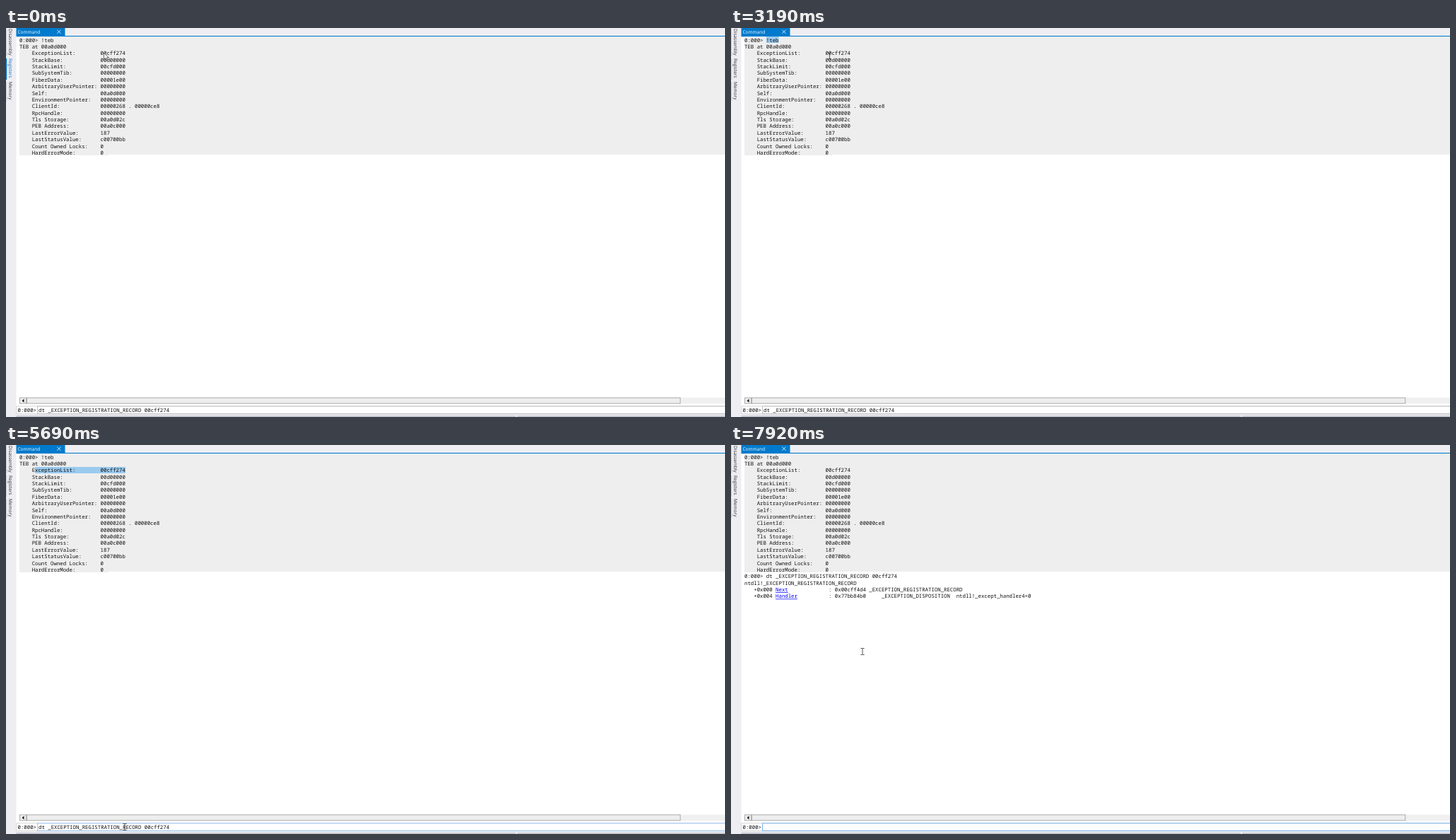
Recreate the animation shown at these times as an HTML page. Size 1017x550 px, loop 8 s.

```html
<!DOCTYPE html>
<html lang="en">
<head>
<meta charset="utf-8">
<title>Debugger command window</title>
<style>
  html, body { margin: 0; width: 100%; height: 100%; overflow: hidden; background: #fff; }
  svg { display: block; width: 1017px; height: 550px; }
  text { white-space: pre; text-rendering: geometricPrecision; }
  .mono { font: 7.35px "Noto Sans Mono", "DejaVu Sans Mono", monospace; fill: #111; }
  .ui { font: 6.5px "Open Sans", "Noto Sans", sans-serif; fill: #2c2c34; }
  .link { fill: #00f; text-decoration: underline; }
</style>
</head>
<body>
<svg viewBox="0 0 1017 550">
  <rect width="1017" height="550" fill="#eeeef2"/>
  <rect x="14.5" y="12" width="1003" height="534" fill="#fff"/>

  <!-- side tabs -->
  <g id="side" class="ui"></g>

  <!-- window tab -->
  <path d="M14.5 0H83.5V11H1017V12.2H14.5z" fill="#007acc"/>
  <text class="ui" x="16.5" y="7.8" style="fill:#fff">Command</text>
  <path d="M72.3 2.7l5.2 5.2m0-5.2l-5.2 5.2" stroke="#fff" stroke-width=".8"/>

  <!-- output -->
  <path d="M19 12.2H1017V179H144V180H19z" fill="#eee"/>
  <rect id="sel" height="9"/>
  <g id="first" class="mono"></g>
  <g id="second" class="mono"></g>

  <!-- scroll bar -->
  <rect x="19" y="522.6" width="998" height="8.6" fill="#f0f0f0"/>
  <g fill="#eee" stroke="#999" stroke-width=".8">
    <rect x="19.4" y="522.9" width="9.4" height="8"/>
    <rect x="29.4" y="522.9" width="924.4" height="8"/>
  </g>
  <path d="M25.5 524.6v4.8l-3-2.4z" fill="#111"/>

  <!-- input -->
  <g fill="#fff" stroke-width=".8">
    <rect x="14.8" y="534.8" width="1010" height="10.8" stroke="#ccc"/>
    <rect id="box" x="44.6" y="534.8" width="980" height="10.8"/>
  </g>
  <text class="mono" x="16.5" y="543">0:000&gt;</text>
  <text id="input" class="mono" x="46" y="542.8">dt _EXCEPTION_REGISTRATION_RECORD 00cff274</text>
  <path d="M14.5 548H721V550H14.5zM723 548H1017V550H723z" fill="#c6c8d2"/>

  <rect id="caret" width="1" height="9" fill="#111"/>
  <path id="arrow" d="M0 0v9.6l2.2-2 1.5 3.4 1.5-.7-1.5-3.3h3z" fill="#fff" stroke="#222" stroke-width=".7"/>
  <path id="beam" d="M-2.5-4.5h2l.5.5.5-.5h2M0-4V4M-2.5 4.5h2l.5-.5.5.5h2" fill="none" stroke="#222" stroke-width=".8"/>
</svg>
<script>
const LOOP = 8000, LEFT = 19, CHAR = 4.41, ROW = 9.38, BLINK = 540;
// moments at which the state changes
const UNHOVER = 1440, PICK = 2600, DRAG = 4400, DROP = 4850,
      LEAVE = 5170, ENTER = 5690, FOCUS = 6050, RUN = 7120, RETURN = 7700;

const $ = id => document.getElementById(id);
const set = (id, attrs) => {
  for (const k in attrs) $(id).setAttribute(k, attrs[k]);
};
const show = (id, on) => set(id, { visibility: on ? "visible" : "hidden" });
const within = (t, from, to) => t >= from && t < to;

const field = (name, value) => "    " + (name + ":").padEnd(22) + value;
const link = name => `<tspan class="link">${name}</tspan>` + " ".repeat(17 - name.length);

function print(id, row, lines) {
  $(id).innerHTML = lines.map((s, i) =>
    `<text x="${LEFT}" y="${19.5 + (row + i) * ROW}">${s}</text>`).join("");
}

const sideTab = (name, y, length) =>
  `<g id="${name}" fill="#cccedb"><rect y="${y}" width="1.2" height="${length}"/>` +
  `<text transform="translate(3.6 ${y}) rotate(90)">${name}</text></g>`;
$("side").innerHTML =
  sideTab("Disassembly", 1, 39) + sideTab("Registers", 43, 30) + sideTab("Memory", 76, 27);

print("first", 0, [
  "0:000&gt; !teb",
  "TEB at 00a0d000",
  field("ExceptionList", "00cff274"),
  field("StackBase", "00d00000"),
  field("StackLimit", "00cfd000"),
  field("SubSystemTib", "00000000"),
  field("FiberData", "00001e00"),
  field("ArbitraryUserPointer", "00000000"),
  field("Self", "00a0d000"),
  field("EnvironmentPointer", "00000000"),
  field("ClientId", "00000268 . 00000ce8"),
  field("RpcHandle", "00000000"),
  field("Tls Storage", "00a0d02c"),
  field("PEB Address", "00a0c000"),
  field("LastErrorValue", "187"),
  field("LastStatusValue", "c00700bb"),
  field("Count Owned Locks", "0"),
  field("HardErrorMode", "0")
]);
print("second", 18, [
  "0:000&gt; dt _EXCEPTION_REGISTRATION_RECORD 00cff274",
  "ntdll!_EXCEPTION_REGISTRATION_RECORD",
  `   +0x000 ${link("Next")}: 0x00cff4d4 _EXCEPTION_REGISTRATION_RECORD`,
  `   +0x004 ${link("Handler")}: 0x77bb84b0     _EXCEPTION_DISPOSITION  ntdll!_except_handler4+0`
]);

// pointer moves: start, end, then where it comes to rest
const moves = [
  [580, 1100, 74, 27.5],
  [UNHOVER, 1820, 77, 19],
  [2040, 2280, 58.5, 20],
  [2860, 3300, 154, 43],
  [3350, 4000, 46.5, 39],
  [DRAG, DROP, 168.5, 38],
  [5030, 5110, 190, 513],
  [LEAVE, ENTER, 168, 540],
  [5900, FOCUS, 174, 538.5],
  [6100, 6600, 249, 541],
  [RETURN, 7920, 186, 292]
];

function pointerAt(t) {
  let x = 138.5, y = 35;
  for (const [from, to, endX, endY] of moves) {
    const k = Math.min(1, Math.max(0, (t - from) / (to - from)));
    const ease = k * k * (3 - 2 * k);
    x += (endX - x) * ease;
    y += (endY - y) * ease;
  }
  return [x, y];
}

// the caret restarts its blinking wherever it is placed
const carets = [
  { from: 160, x: 19, y: 181 },
  { from: PICK, x: 67, y: 12 },
  { from: DROP, x: 168, y: 31 },
  { from: FOCUS, x: 169, y: 536 },
  { from: RUN, x: 46, y: 536 }
];

function drawCaret(t) {
  const caret = carets.filter(c => c.from <= t).pop();
  show("caret", caret && Math.floor((t - caret.from) / BLINK) % 2 === 0);
  if (caret) set("caret", { x: caret.x, y: caret.y });
}

// a double click picks the command, then a drag picks the list row
function drawSelection(t, x) {
  const drag = t >= DRAG;
  const start = drag ? 5 : 7;
  const reach = Math.min(34, Math.max(5, Math.round((x - LEFT) / CHAR)));
  const end = !drag ? 11 : t < DROP ? reach : 34;
  set("sel", {
    x: LEFT + start * CHAR, y: drag ? 31 : 12, width: (end - start) * CHAR,
    fill: t < FOCUS ? "#9acaee" : "#d1d9dd"
  });
  show("sel", within(t, PICK, RUN));
}

function draw(t) {
  const [x, y] = pointerAt(t);
  const place = { transform: `translate(${x} ${y})` };
  const hidden = within(t, LEAVE, ENTER) || within(t, RUN, RETURN);
  set("arrow", place);
  set("beam", place);
  show("arrow", t < UNHOVER);
  show("beam", t >= UNHOVER && !hidden);

  set("Registers", { fill: t < UNHOVER ? "#007acc" : "#cccedb" });
  $("Registers").lastChild.style.fill = t < UNHOVER ? "#0e70c0" : "#2c2c34";
  drawSelection(t, x);
  drawCaret(t);

  set("box", { stroke: t < ENTER ? "#abadb3" : t < FOCUS ? "#7eb4ea" : "#569de5" });
  show("input", t < RUN);
  show("second", t >= RUN);
}

// group fill colours the bars only
for (const label of $("side").querySelectorAll("text")) label.style.fill = "#2c2c34";

const begin = performance.now();
function tick() {
  draw((performance.now() - begin) % LOOP);
  requestAnimationFrame(tick);
}
tick();
</script>
</body>
</html>
```
